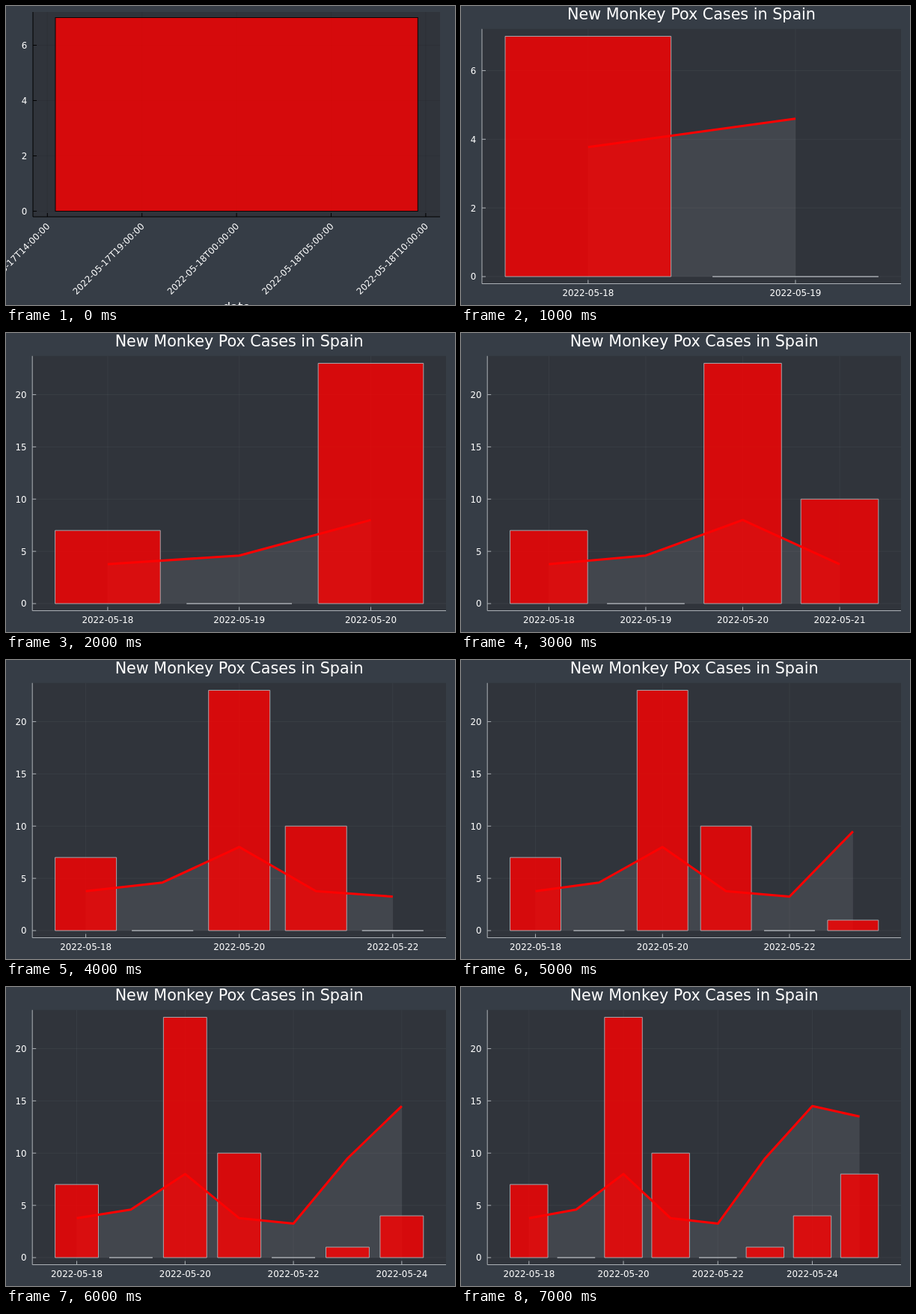
An HTML page that plays this animation: 600x400 px, repeating every 8 s.

```html
<!DOCTYPE html>
<html lang="en">
<head>
<meta charset="utf-8">
<title>New cases per day</title>
<style>
  html, body { margin: 0; width: 100%; height: 100%; overflow: hidden; background: #363d46; }
  svg { display: block; width: 600px; height: 400px; }
  text { font: 11.86px "DejaVu Sans", sans-serif; fill: #fff; }
  .title { font-size: 20.7px; }
  .guide { font-size: 16.3px; }
  .mid { text-anchor: middle; }
  .end { text-anchor: end; }
  .panel { fill: #30343b; }
  .grid { stroke: var(--ink); stroke-opacity: .07; }
  .axis { fill: none; stroke: var(--ink); }
  .bar { fill: #f00; fill-opacity: .8; stroke: var(--ink); stroke-opacity: .9; }
  .area { fill: #adb2b7; fill-opacity: .14; }
  .trend { fill: none; stroke: #f00; stroke-width: 3; stroke-linejoin: round; }
  .plot { --ink: #adb2b7; visibility: hidden; animation: show 8s step-end infinite; }
  .first { --ink: #000; }
  @keyframes show {
    0% { visibility: visible; }
    12.5%, 100% { visibility: hidden; }
  }
</style>
</head>
<body>
<svg id="stage" viewBox="0 0 600 400"></svg>
<script>
const cases = [7, 0, 23, 10, 0, 1, 4, 8];
const trend = [3.77, 4.6, 8, 3.77, 3.25, 9.5, 14.5, 13.5];

const label = (x, y, cls, str, extra = '') =>
  `<text x="${x}" y="${y}" class="${cls}" ${extra}>${str}</text>`;
const path = (cls, d) => `<path class="${cls}" d="${d}"/>`;
const rect = (cls, x, y, w, h) =>
  `<rect class="${cls}" x="${x}" y="${y}" width="${w}" height="${h}"/>`;

// Panel, grid, axes with inward ticks, and value labels
function frame({ left, right, top, bottom, xs, ys, y }) {
  let grid = '', axis = `M${left} ${top}V${bottom}H${right}`, text = '';
  for (const x of xs) {
    grid += `M${x} ${top}V${bottom}`;
    axis += `M${x} ${bottom}v-5`;
  }
  for (const v of ys) {
    grid += `M${left} ${y(v)}H${right}`;
    axis += `M${left} ${y(v)}h5`;
    text += label(left - 7.7, y(v) + 4.4, 'end', v);
  }
  return rect('panel', left, top, right - left, bottom - top) +
    path('grid', grid) + path('axis', axis) + text;
}

function hourly() {
  const y = v => 274.5 - v * 37;
  const hours = ['17T14', '17T19', '18T00', '18T05', '18T10'];
  const xs = hours.map((_, i) => 55.3 + i * 126.4);
  return frame({ left: 36, right: 580, top: 8, bottom: 282, xs, ys: [0, 2, 4, 6], y }) +
    rect('bar', 66, y(7), 484.3, 259) +
    hours.map((h, i) => label(0, 0, 'end', `2022-05-${h}:00:00`,
      `transform="translate(${xs[i] + 4} 295.3) rotate(-45)"`)).join('') +
    label(308, 408.4, 'mid guide', 'date');
}

function daily(n) {
  const small = n === 2;
  const left = small ? 28 : 35.2, right = 588;
  const start = small ? 59 : 65.6;
  const step = (557.8 - start) / (n - .2);
  const scale = 321.5 / (small ? 7 : 23);
  const x = i => start + (i + .4) * step;
  const y = v => 362 - v * scale;
  const days = [...Array(n).keys()];
  const ticks = days.filter(i => n < 5 || i % 2 === 0);
  const line = 'M' + days.map(i => `${x(i)} ${y(trend[i])}`).join('L');
  return frame({
    left, right, top: 30.7, bottom: 371.5, y,
    xs: ticks.map(x), ys: small ? [0, 2, 4, 6] : [0, 5, 10, 15, 20]
  }) +
    path('area', `${line}V${y(0)}H${x(0)}Z`) +
    days.map(i => path('bar',
      `M${x(i) - .4 * step} ${y(0)}V${y(cases[i])}h${.8 * step}V${y(0)}Z`)).join('') +
    path('trend', line) +
    ticks.map(i => label(x(i), 387.8, 'mid', `2022-05-${18 + i}`)).join('') +
    label((left + right) / 2, 18.2, 'mid title', 'New Monkey Pox Cases in Spain');
}

const plots = [hourly(), ...[2, 3, 4, 5, 6, 7, 8].map(daily)];
document.getElementById('stage').innerHTML = plots.map((p, k) =>
  `<g class="plot${k ? '' : ' first'}" style="animation-delay:${k ? k - 8 : 0}s">${p}</g>`).join('');
</script>
</body>
</html>
```
